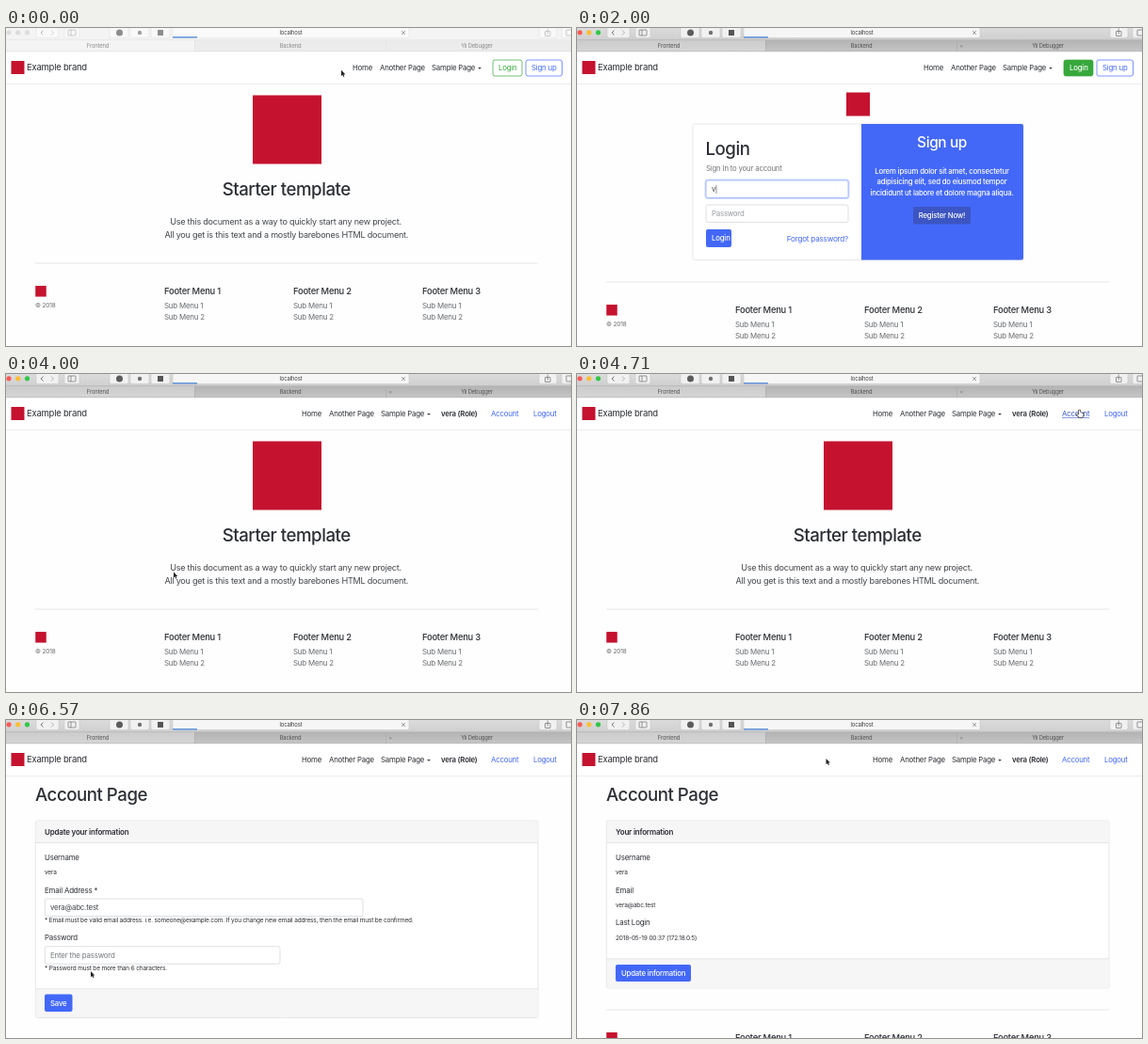
An HTML page with a canvas that plays this animation: 600 by 338 pixels, repeating every 8 s.

```html
<!DOCTYPE html>
<html lang="en">
<head>
<meta charset="utf-8">
<title>Starter template walkthrough</title>
<style>
  html, body { margin: 0; width: 100%; height: 100%; overflow: hidden; background: #fff; }
  canvas { display: block; width: 600px; height: 338px; }
</style>
</head>
<body>
<canvas id="stage"></canvas>
<script>
const W = 600, H = 338, LOOP = 8000;
const INK = '#2b2e33', SOFT = '#42464b', GREY = '#74787c', BLUE = '#4368f8', DEEP = '#3a57cb';
const GREEN = '#37a83c', RED = '#c4122f', LINE = '#dedede';
const BODY = 7.8, SMALL = 6.5, LEAD = 9.05, TITLE = 18.65;
const LOGIN = [517, 34, 31, 17], ACCOUNT = [514, 35, 31, 14];
const SUBMIT = [137, 214, 27, 19], UPDATE = [41, 260, 80, 18], SAVE = [41, 291.5, 29.5, 18.5];

const canvas = document.getElementById('stage');
const ratio = window.devicePixelRatio || 1;
canvas.width = W * ratio;
canvas.height = H * ratio;
const ctx = canvas.getContext('2d');
ctx.scale(ratio, ratio);

// Pointer stops: time, x, y
const stops = [
  [0, 356, 44.8], [250, 356, 44.8], [1000, 533, 45], [2850, 533, 45],
  [3150, 149, 224.5], [3900, 149, 224.5], [4500, 533, 38.5], [5000, 533, 38.5],
  [5650, 90, 267], [6600, 90, 267], [7150, 62.5, 297], [7570, 62.5, 297],
  [7840, 264.5, 41], [LOOP, 264.5, 41]
];

function pointerAt(t) {
  const i = Math.max(1, stops.findIndex(s => s[0] > t));
  const [t0, x0, y0] = stops[i - 1], [t1, x1, y1] = stops[i];
  const u = (t - t0) / (t1 - t0), k = u * u * (3 - 2 * u);
  return { x: x0 + (x1 - x0) * k, y: y0 + (y1 - y0) * k };
}

function pageAt(t) {
  if (t < 1500) return 'home';
  if (t < 3650) return 'login';
  if (t < 4850) return 'member';
  return t >= 6000 && t < 7550 ? 'form' : 'account';
}

const over = (p, [x, y, w, h]) => p.x >= x && p.x <= x + w && p.y >= y && p.y <= y + h;

function text(str, x, y, size = BODY, color = INK, weight = 400, align = 'left') {
  ctx.font = `${weight} ${size}px Inter, Roboto, sans-serif`;
  ctx.letterSpacing = `${-0.025 * size}px`;
  ctx.textAlign = align;
  ctx.fillStyle = color;
  ctx.fillText(str, x, y);
}

function fill(x, y, w, h, color) {
  ctx.fillStyle = color;
  ctx.fillRect(x, y, w, h);
}

function shade(x, y, w, h, top, bottom) {
  const g = ctx.createLinearGradient(0, y, 0, y + h);
  g.addColorStop(0, top);
  g.addColorStop(1, bottom);
  fill(x, y, w, h, g);
}

function box([x, y, w, h], color, border, r = 2, line = 0.7) {
  ctx.beginPath();
  ctx.roundRect(x, y, w, h, r);
  if (color) { ctx.fillStyle = color; ctx.fill(); }
  if (border) { ctx.strokeStyle = border; ctx.lineWidth = line; ctx.stroke(); }
}

function disc(x, y, r, color) {
  ctx.beginPath();
  ctx.arc(x, y, r, 0, Math.PI * 2);
  ctx.fillStyle = color;
  ctx.fill();
}

function stroke(points, color, width = 0.7) {
  ctx.beginPath();
  points.forEach(([x, y], i) => i ? ctx.lineTo(x, y) : ctx.moveTo(x, y));
  ctx.strokeStyle = color;
  ctx.lineWidth = width;
  ctx.stroke();
}

function square(cx, cy, size) {
  fill(cx - size / 2, cy - size / 2, size, size, RED);
}

function button(rect, label, baseline, hover) {
  box(rect, hover ? DEEP : BLUE);
  text(label, rect[0] + 6, baseline, BODY, '#fff', 500);
}

// The window chrome is washed out until the window becomes active.
function browser(t) {
  const pale = t < 140;
  const icon = pale ? '#b4b4b4' : '#6a6a6a';
  const edge = pale ? '#dedede' : '#c2c2c2';
  const label = pale ? '#8a8a8a' : '#505050';
  if (pale) {
    fill(0, 0, W, 13, '#f4f4f4');
    fill(0, 13, W, 12, '#ececec');
    fill(0, 13, 200, 12, '#f4f4f4');
  } else {
    shade(0, 0, W, 13, '#dcdbdc', '#d0cfd0');
    shade(0, 13, W, 12, '#b4b3b4', '#c6c5c6');
    shade(0, 13, 200, 12, '#cdcccd', '#d6d5d6');
  }
  fill(0, 12.5, W, 0.6, pale ? '#e0e0e0' : '#adacad');
  fill(0, 24.6, W, 0.6, pale ? '#dadada' : '#adacad');
  for (const x of [200, 403]) fill(x, 13, 0.7, 12, pale ? '#e2e2e2' : '#adacad');

  const lights = pale ? ['#dcdcdc', '#dcdcdc', '#dcdcdc'] : ['#fb5b55', '#fbbd34', '#33c748'];
  lights.forEach((color, i) => disc(3 + i * 9.75, 4.8, 2.6, color));

  for (const [x, w] of [[32, 24], [62, 16], [110, 20], [132, 20], [154, 20], [566, 19], [590, 14]])
    box([x, -3, w, 13.5], pale ? '#f9f9f9' : '#f1f1f1', edge, 2, 0.5);
  box([177, -3, 251, 13.5], pale ? '#fafafa' : '#f6f6f6', edge, 2, 0.5);
  fill(177, 9.2, 26, 1.3, '#4b86d8');

  stroke([[39.5, 2.5], [37, 5], [39.5, 7.5]], icon, 0.9);
  stroke([[48, 2.5], [50.5, 5], [48, 7.5]], pale ? '#ccc' : '#aaa', 0.9);
  box([66, 2, 8, 6], null, icon, 0.5);
  stroke([[69, 2], [69, 8]], icon);
  disc(120.5, 5, 3.5, pale ? '#8c8c8c' : '#5c5c5c');
  disc(142, 5, 2.2, pale ? '#a0a0a0' : '#707070');
  fill(161, 2, 6, 6, pale ? '#8c8c8c' : '#555');
  box([572.5, 3.5, 5.5, 5], null, icon, 0.4);
  stroke([[575.2, 6.5], [575.2, 0.5]], icon);
  box([595, 2, 6, 6], null, icon, 0.4);
  stroke([[420.2, 3], [424, 7]], '#777');
  stroke([[424, 3], [420.2, 7]], '#777');

  text('localhost', 302.5, 7.2, 5.9, '#3c3c3c', 400, 'center');
  text('Frontend', 97.5, 21.2, 5.8, label, 400, 'center');
  text('Backend', 302, 21.2, 5.8, label, 400, 'center');
  text('Yii Debugger', 500, 21.2, 5.8, label, 400, 'center');
  if (!pale) text('×', 406.5, 21, 5.5, '#777');
}

function navbar(page, p) {
  fill(0, 25, W, 34.5, '#fff');
  fill(0, 59, W, 0.8, '#e8e8e8');
  square(12.5, 42, 14);
  text('Example brand', 22, 45.3, 9.5);

  const guest = page === 'home' || page === 'login';
  const shift = guest ? 0 : -54;
  text('Home', 368 + shift, 45.4);
  text('Another Page', 397 + shift, 45.4);
  text('Sample Page', 452 + shift, 45.4);
  const cx = 503 + shift;
  ctx.beginPath();
  ctx.moveTo(cx - 1.9, 41.9);
  ctx.lineTo(cx + 1.9, 41.9);
  ctx.lineTo(cx, 43.8);
  ctx.fillStyle = INK;
  ctx.fill();

  if (guest) {
    const lit = page === 'login' || over(p, LOGIN);
    box(LOGIN, lit ? GREEN : '#fff', GREEN);
    text('Login', 523, 45.4, BODY, lit ? '#fff' : GREEN, lit ? 500 : 400);
    box([552, 34, 38.5, 17], '#fff', BLUE);
    text('Sign up', 558, 45.4, BODY, BLUE);
    return;
  }
  text('vera (Role)', 462, 44.8, BODY, INK, 600);
  const color = over(p, ACCOUNT) ? DEEP : BLUE;
  text('Account', 515, 45.4, BODY, color);
  if (color === DEEP) fill(515, 46.3, 29, 0.6, DEEP);
  text('Logout', 560, 45.4, BODY, BLUE);
}

function footer(dy) {
  fill(31, 249.6 + dy, 534, 0.8, '#dfdfdf');
  square(37, 279.8 + dy, 11.5);
  text('© 2018', 31, 297.2 + dy, 6.5, '#666');
  [168, 305, 442].forEach((x, i) => {
    text(`Footer Menu ${i + 1}`, x, 282.6 + dy, 9.4, INK, 500);
    text('Sub Menu 1', x, 298 + dy, 7.9, '#666a6e');
    text('Sub Menu 2', x, 309.6 + dy, 7.9, '#666a6e');
  });
}

function home() {
  square(298.5, 108, 73);
  text('Starter template', 297.7, 178.2, TITLE, INK, 500, 'center');
  text('Use this document as a way to quickly start any new project.', 297, 208.6, LEAD, SOFT, 400, 'center');
  text('All you get is this text and a mostly barebones HTML document.', 297.8, 222.8, LEAD, SOFT, 400, 'center');
  footer(0);
}

function field(rect, focus) {
  if (focus) box(rect, '#fff', '#cfdafd', 2.5, 3);
  box(rect, '#fff', focus ? '#8fa8f8' : '#cfd3d8');
}

const typed = (t, from, step, n) => Math.max(0, Math.min(n, Math.floor((t - from) / step) + 1));

function login(t, p) {
  square(298.5, 81, 25);
  box([123, 102, 351, 144.5], '#fff', LINE);
  box([302, 102, 172, 144.5], BLUE, null, [0, 2, 2, 0]);

  text('Login', 136.5, 134.6, TITLE, INK, 500);
  text('Sign In to your account', 137, 151.5, BODY, GREY);
  const name = 'vera'.slice(0, typed(t, 1900, 110, 4));
  const dots = typed(t, 2450, 70, 6);
  const second = t >= 2380;
  field([137, 162, 151, 18.5], !second);
  field([137, 188, 151, 18.5], second);
  text(name || 'Username', 143, 174.2, BODY, name ? '#44484c' : '#969a9e');
  if (!second) fill(143 + (name ? ctx.measureText(name).width + 0.5 : 0), 167, 0.6, 9, '#444');
  if (!dots) text('Password', 143, 200.2, BODY, '#969a9e');
  for (let i = 0; i < dots; i++) disc(144.6 + i * 3.45, 197.8, 1.25, INK);
  if (second) fill(143.2 + dots * 3.45, 193, 0.6, 9, '#444');
  button(SUBMIT, 'Login', 226.4, over(p, SUBMIT));
  text('Forgot password?', 288, 226.6, 8.1, BLUE, 400, 'right');

  text('Sign up', 387.5, 127.2, 15.4, '#fff', 500, 'center');
  ['Lorem ipsum dolor sit amet, consectetur',
   'adipisicing elit, sed do eiusmod tempor',
   'incididunt ut labore et dolore magna aliqua.'
  ].forEach((row, i) => text(row, 387.5, 154.8 + i * 11.6, 7.8, '#fff', 500, 'center'));
  box([357, 190, 61, 18.5], '#3c55c2');
  text('Register Now!', 387.5, 202.4, BODY, '#fff', 500, 'center');
  footer(20);
}

function card(title, footTop, bottom) {
  text('Account Page', 31, 86.4, TITLE, INK, 500);
  box([31.4, 107, 533.6, bottom - 107], '#fff', LINE);
  box([31.8, 107.4, 532.8, 23], '#f6f6f7', null, [2, 2, 0, 0]);
  box([31.8, footTop, 532.8, bottom - footTop - 0.4], '#f6f6f7', null, [0, 0, 2, 2]);
  fill(31.4, 130, 533.6, 0.7, LINE);
  fill(31.4, footTop, 533.6, 0.7, LINE);
  text(title, 41, 121.5, 8, INK, 600);
  text('Username', 41, 148.9, 7.9);
  text('vera', 41, 164.2, SMALL);
}

function account(p) {
  card('Your information', 253.5, 285);
  text('Email', 41, 183.7, 7.9);
  text('vera@abc.test', 41, 199, SMALL);
  text('Last Login', 41, 218.3, 7.9);
  text('2018-05-19 00:37 (172.18.0.5)', 41, 233.7, SMALL);
  button(UPDATE, 'Update information', 272, over(p, UPDATE));
  footer(58);
}

function form(p) {
  card('Update your information', 285.5, 316.5);
  text('Email Address *', 41, 183.7, 7.9);
  field([41.4, 190, 337.6, 18.5]);
  text('vera@abc.test', 47, 202.2, 7.9, '#44484c');
  text('* Email must be valid email address. i.e. someone@example.com. If you change new email address, then the email must be confirmed.', 41, 215.2, SMALL);
  text('Password', 41, 234.3, 7.9);
  field([41.4, 240.7, 249.6, 18.5]);
  text('Enter the password', 47, 252.9, 7.9, GREY);
  text('* Password must be more than 6 characters.', 41, 266.2, SMALL);
  button(SAVE, 'Save', 303.9, over(p, SAVE));
  footer(92);
}

function pointer(p, hand) {
  const shape = hand
    ? [[0, 0], [1.2, 0], [1.5, 2.6], [4.4, 3.2], [4.6, 5.2], [3.6, 7.6], [0.3, 7.6], [-2.2, 4.7], [-1.4, 4], [-0.2, 5]]
    : [[0, 0], [0, 6.2], [1.5, 4.9], [2.4, 7.1], [3.4, 6.7], [2.5, 4.6], [4.3, 4.5]];
  ctx.beginPath();
  for (const [x, y] of shape) ctx.lineTo(p.x + x, p.y + y);
  ctx.closePath();
  ctx.lineJoin = 'round';
  ctx.lineWidth = hand ? 1.4 : 1;
  ctx.strokeStyle = hand ? '#333' : '#fff';
  ctx.fillStyle = hand ? '#fff' : '#222';
  ctx.stroke();
  ctx.fill();
}

function draw(now) {
  const t = now % LOOP, page = pageAt(t), p = pointerAt(t);
  fill(0, 0, W, H, '#fefefe');
  if (page === 'login') login(t, p);
  else if (page === 'account') account(p);
  else if (page === 'form') form(p);
  else home();
  navbar(page, p);
  browser(t);

  const links = { home: LOGIN, login: t < 2850 ? LOGIN : SUBMIT, member: ACCOUNT, account: UPDATE, form: SAVE };
  const hand = over(p, links[page]) || (page === 'account' && over(p, ACCOUNT));
  // The pointer hides while keys are pressed.
  if (t < 1850 || t >= 2850) pointer(p, hand);
  requestAnimationFrame(draw);
}
requestAnimationFrame(draw);
</script>
</body>
</html>
```
